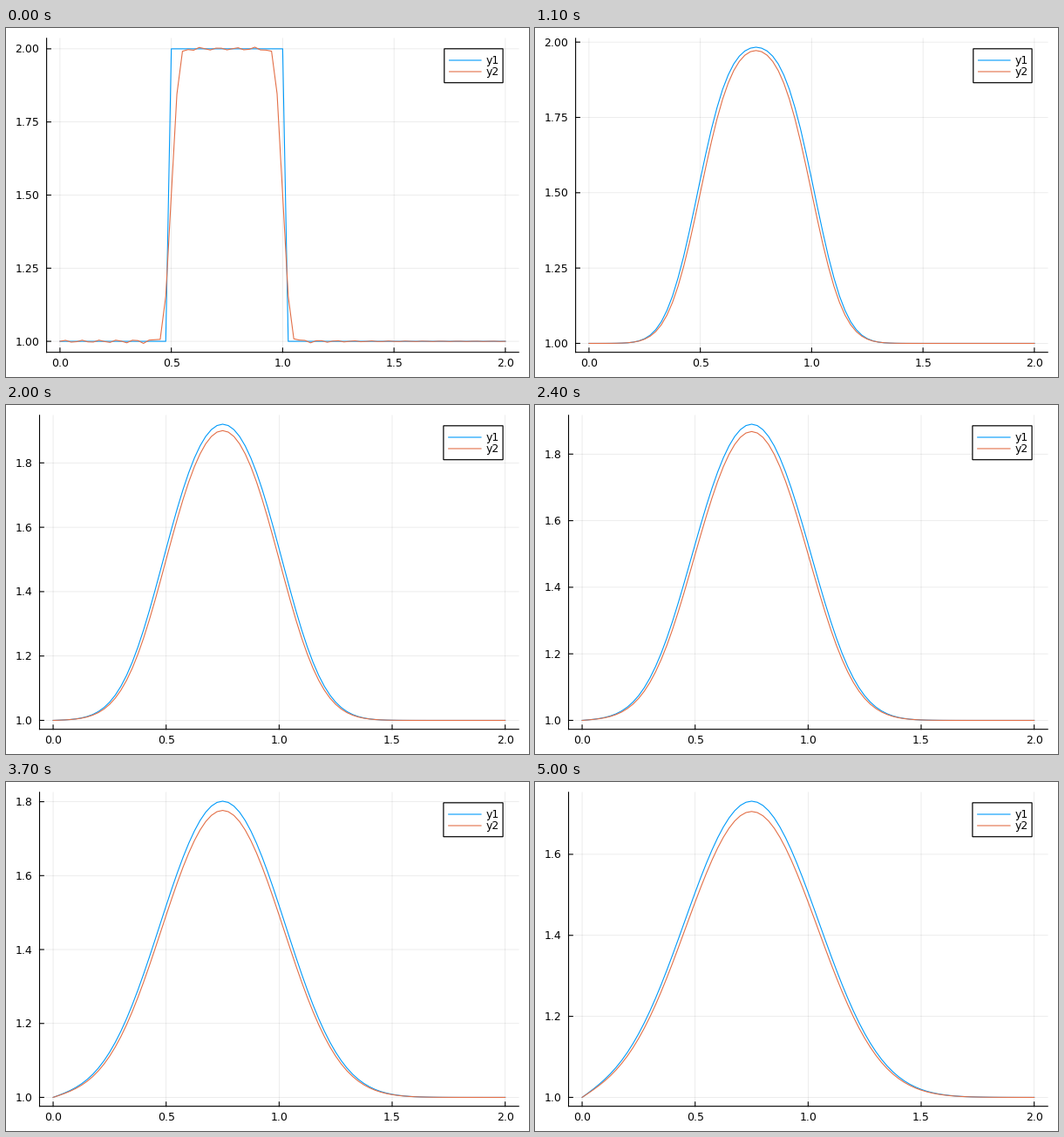
These frames come from a looping animation (600 by 400 pixels, 5.05 s). A matplotlib script:

```python
import numpy as np
import matplotlib.pyplot as plt
from matplotlib.animation import FuncAnimation
from matplotlib.patches import Rectangle

W, H, DPI = 600, 400, 100
FRAMES, INTERVAL = 101, 50
BLUE, ORANGE = "#009afa", "#e36f47"
TOP, BOTTOM, RIGHT = 11.8, 371.65, 588.2
PAD = 0.03          # share of the data range added on each side
TICK = 4.8

# Heat equation on [0, 2], ends held at 1
CELLS, R, TERMS = 80, 0.45, 50
x = np.linspace(0, 2, CELLS + 1)


def explicit_steps():
    u = np.where((x > 0.49) & (x < 1.01), 2.0, 1.0)
    steps = [u]
    for _ in range(FRAMES - 1):
        v = u.copy()
        v[1:-1] += R * (u[2:] - 2 * u[1:-1] + u[:-2])
        steps.append(v)
        u = v
    return steps


def sine_series(step):
    n = np.arange(1, TERMS + 1)
    coef = 2 / (n * np.pi) * (np.cos(n * np.pi / 4) - np.cos(n * np.pi / 2))
    decay = np.exp(-R * step * (n * np.pi / CELLS) ** 2)
    return 1 + np.sin(np.outer(x, n) * np.pi / 2) @ (coef * decay)


numeric = explicit_steps()
exact = [sine_series(k + 1) for k in range(FRAMES)]

plt.rcParams["font.family"] = "DejaVu Sans"
fig = plt.figure(figsize=(W / DPI, H / DPI), dpi=DPI, facecolor="white")
ax = fig.add_axes([0, 0, 1, 1])


def line(xs, ys, color="black", width=1.1, **kw):
    ax.plot(xs, ys, color=color, lw=width * 72 / DPI, snap=False, **kw)


def label(px, py, text, ha):
    ax.text(px, py, text, ha=ha, va="baseline", fontsize=9, color="black")


def legend(left):
    ax.add_patch(Rectangle((left, 23.8), 570.1 - left, 38.9, fc="white",
                           ec="black", lw=1.2 * 72 / DPI, snap=False, zorder=5))
    for name, y, color in (("y1", 37, BLUE), ("y2", 50, ORANGE)):
        line([left + 5.8, 545], [y, y], color, zorder=6)
        ax.text(550.7, y + 4.3, name, fontsize=9, va="baseline", zorder=6)


def draw(k):
    ax.clear()
    ax.set_xlim(0, W)
    ax.set_ylim(H, 0)
    ax.axis("off")

    curves = ((numeric[k], BLUE), (exact[k], ORANGE))
    low = min(c.min() for c, _ in curves)
    high = max(c.max() for c, _ in curves)
    pad = PAD * (high - low)
    low, high = low - pad, high + pad

    step, digits = (0.25, 2) if high >= 2 else (0.2, 1)
    left = 46.6 if digits == 2 else 38.5

    def to_x(v):
        return left + (v + 2 * PAD) / (2 + 4 * PAD) * (RIGHT - left)

    def to_y(v):
        return BOTTOM - (v - low) / (high - low) * (BOTTOM - TOP)

    for v in np.arange(0, 2.1, 0.5):
        px = to_x(v)
        line([px, px], [TOP, BOTTOM], width=0.7, alpha=0.1)
        line([px, px], [BOTTOM, BOTTOM - TICK])
        label(px, 388, f"{v:.1f}", "center")
    for v in np.arange(1, high, step):
        py = to_y(v)
        line([left, RIGHT], [py, py], width=0.7, alpha=0.1)
        line([left, left + TICK], [py, py])
        label(left - 8.2, py + 4.5, f"{v:.{digits}f}", "right")

    line([left, left], [TOP, BOTTOM])
    line([left, RIGHT], [BOTTOM, BOTTOM])
    for values, color in curves:
        line(to_x(x), to_y(values), color)
    legend(502.8 if digits == 2 else 501.9)
    return []


anim = FuncAnimation(fig, draw, frames=FRAMES, interval=INTERVAL,
                     repeat=True, repeat_delay=0, blit=False)
plt.show()
```
